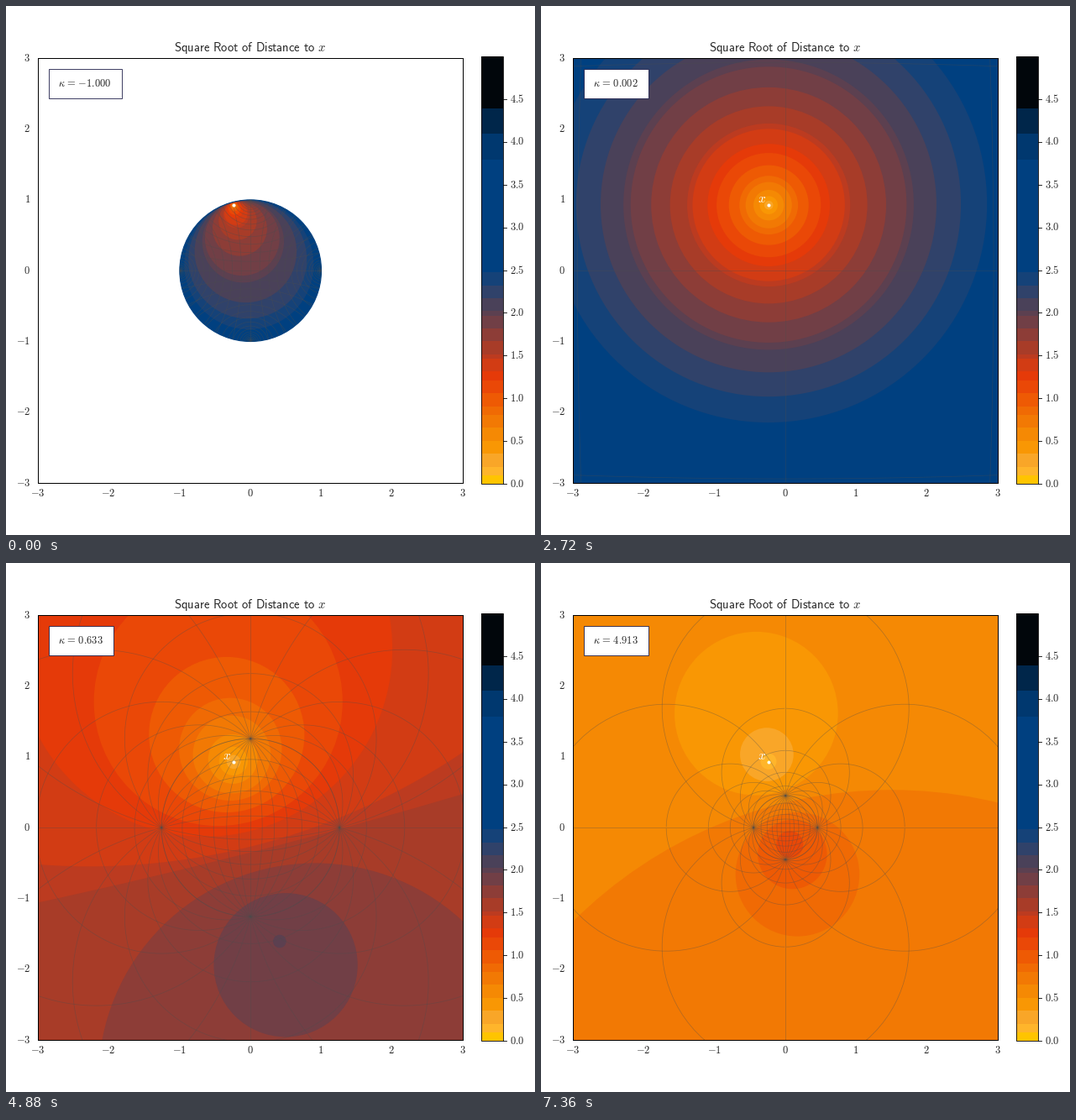
Write a matplotlib script that moves like this. It is 630 px wide and 630 px high and loops after 7400 ms.

```python
import numpy as np
import matplotlib.pyplot as plt
from matplotlib.animation import FuncAnimation
from matplotlib.collections import LineCollection
from matplotlib.patches import Circle, Rectangle

plt.rcParams["mathtext.fontset"] = "cm"

SIZE, DPI = 630, 100
LEFT, TOP, SIDE = 38.2, 62.2, 506
BAR_X, BAR_W, BAR_Y0, BAR_UNIT = 566.1, 26, 569.3, 101.9

# Curvature follows a cubic; the nearly flat part is skipped.
roots = np.linspace(-1, 1.7, 200)
KAPPAS = roots[np.abs(roots) >= 0.1] ** 3

X = np.array([-0.237, 0.925])
X_NORM = np.hypot(*X)
X_DIR = X / X_NORM

STEPS = [2, 4, 7, 10, 13, 16, 18, 21, 24, 26, 29, 30, 33, 36, 39, 40, 43,
         46, 49, 75, 81, 87]
LEVELS = np.array(STEPS) * 5 / 99
COLORS = ["#ffc400", "#ffb52b", "#f9a628", "#f99704", "#f58904", "#f27904",
          "#f06a04", "#ee5a04", "#ea4807", "#e53a09", "#d23c14", "#bc3b20",
          "#a83c28", "#8d3d37", "#713f46", "#5c4050", "#4a4159", "#30426a",
          "#154278", "#004080", "#00386f", "#00264a", "#01060b"]
RIM_DIST = 2 * np.arctanh(1 - 1e-5)  # numerical reach of the unit ball

fig = plt.figure(figsize=(SIZE / DPI, SIZE / DPI), dpi=DPI, facecolor="white")

ax = fig.add_axes([LEFT / SIZE, 1 - (TOP + SIDE) / SIZE, SIDE / SIZE, SIDE / SIZE])
ax.set(xlim=(-3, 3), ylim=(-3, 3), xticks=[], yticks=[])
for spine in ax.spines.values():
    spine.set_linewidth(0.72)

# Overlay in pixel coordinates, y pointing down.
page = fig.add_axes([0, 0, 1, 1], zorder=5)
page.set(xlim=(0, SIZE), ylim=(SIZE, 0))
page.axis("off")


def label(x, y, s, size=9, **kw):
    kw = {"ha": "center", "va": "center", "color": "0.15", **kw}
    return page.text(x, y, f"${s}$", fontsize=size, **kw)


def draw_static():
    gap = r"\hspace{0.379}"
    words = gap.join(r"\mathsf{%s}" % w for w in "Square Root of Distance to".split())
    label(290.7, 53.7, words + gap + "x", 10.5, va="baseline")

    for v in range(-3, 4):
        pos = (v + 3) * SIDE / 6
        label(LEFT + pos - 0.8, 580.7, v)
        label(29, TOP + SIDE - pos, v, ha="right")

    edges = [0, *LEVELS, 5]
    for lo, hi, color in zip(edges, edges[1:], COLORS):
        page.add_patch(Rectangle((BAR_X, BAR_Y0 - hi * BAR_UNIT), BAR_W,
                                 (hi - lo) * BAR_UNIT, color=color, lw=0))
    page.add_patch(Rectangle((BAR_X, BAR_Y0 - 5 * BAR_UNIT), BAR_W, 5 * BAR_UNIT,
                             fill=False, ec="black", lw=0.6))
    for v in np.arange(0, 5, 0.5):
        y = BAR_Y0 - v * BAR_UNIT
        page.plot([BAR_X + BAR_W, BAR_X + BAR_W + 4], [y, y], color="black", lw=0.6)
        label(600, y, f"{v:.1f}", ha="left")


draw_static()

ball = ax.add_patch(Circle((0, 0), 1, lw=0, zorder=0.5))
rim = ax.add_patch(Circle((0, 0), 1, fill=False, lw=0.8, zorder=1.5))
discs = [ax.add_patch(Circle((0, 0), 1, lw=0)) for _ in LEVELS]
grid = ax.add_collection(LineCollection([], colors=[(0.3, 0.3, 0.3, 0.38)],
                                        linewidths=0.55, zorder=2), autolim=False)
ax.plot(*X, "o", color="white", ms=2.9, mew=0, zorder=3)
label(263.2, 229.2, "x", 11, color="white")

box = page.add_patch(Rectangle((51.1, 75.1), 87, 35, fc="white", ec="#1c1c48", lw=0.6))
kappa_text = label(62.2, 96.2, r"\kappa", ha="left", va="baseline")


def geodesics(kappa, radius):
    """Geodesics crossing both axes at right angles, projected to the plane."""
    if kappa > 0:
        sn, cs = np.sin, np.cos
        count = np.arange(-5, 7)
        t = np.linspace(-0.999 * np.pi, 0.999 * np.pi, 500)
    else:
        sn, cs = np.sinh, np.cosh
        count = np.arange(-22, 23)
        t = np.linspace(-7, 7, 120)
    s = count[:, None] * np.pi / 12
    scale = radius / (1 + cs(t) * cs(s))
    a, b = cs(t) * sn(s) * scale, sn(t) * scale
    return np.concatenate([np.stack([a, b], -1), np.stack([b, a], -1)])


def update(i):
    kappa = KAPPAS[i]
    radius = 1 / np.sqrt(abs(kappa))
    sphere = kappa > 0
    tan, atan = (np.tan, np.arctan) if sphere else (np.tanh, np.arctanh)

    theta = 2 * atan(X_NORM / radius)
    rho = LEVELS ** 2 / radius
    near, far = (theta - rho) / 2, (theta + rho) / 2
    inner = far < np.pi / 2 if sphere else np.ones(len(LEVELS), bool)
    p, q = radius * tan(near), radius * tan(far)

    # Past the point at infinity a ball becomes the outside of a disc.
    for k, disc in enumerate(discs):
        disc.set_visible(bool(rho[k] < (np.pi if sphere else RIM_DIST)))
        disc.set_center(tuple(X_DIR * (p[k] + q[k]) / 2))
        disc.set_radius(abs(q[k] - p[k]) / 2)
        disc.set_facecolor(COLORS[k] if inner[k] else COLORS[k + 1])
        disc.set_zorder(1 - 0.01 * k if inner[k] else 1 + 0.01 * k)

    far_color = COLORS[np.searchsorted(LEVELS, np.sqrt(RIM_DIST * radius))]
    for part in (ball, rim):
        part.set_visible(not sphere)
        part.set_radius(radius)
    ball.set_facecolor(far_color)
    rim.set_edgecolor(far_color)
    ax.set_facecolor(COLORS[inner.sum()] if sphere else "white")
    grid.set_segments(geodesics(kappa, radius))

    box.set_width(77 if sphere else 87)
    kappa_text.set_text(r"$\kappa\hspace{0.12}=\hspace{0.12}{%.3f}$" % kappa)
    return [ball, rim, *discs, grid, box, kappa_text]


anim = FuncAnimation(fig, update, frames=len(KAPPAS), interval=40,
                     repeat=True, repeat_delay=0, blit=False)
plt.show()
```
